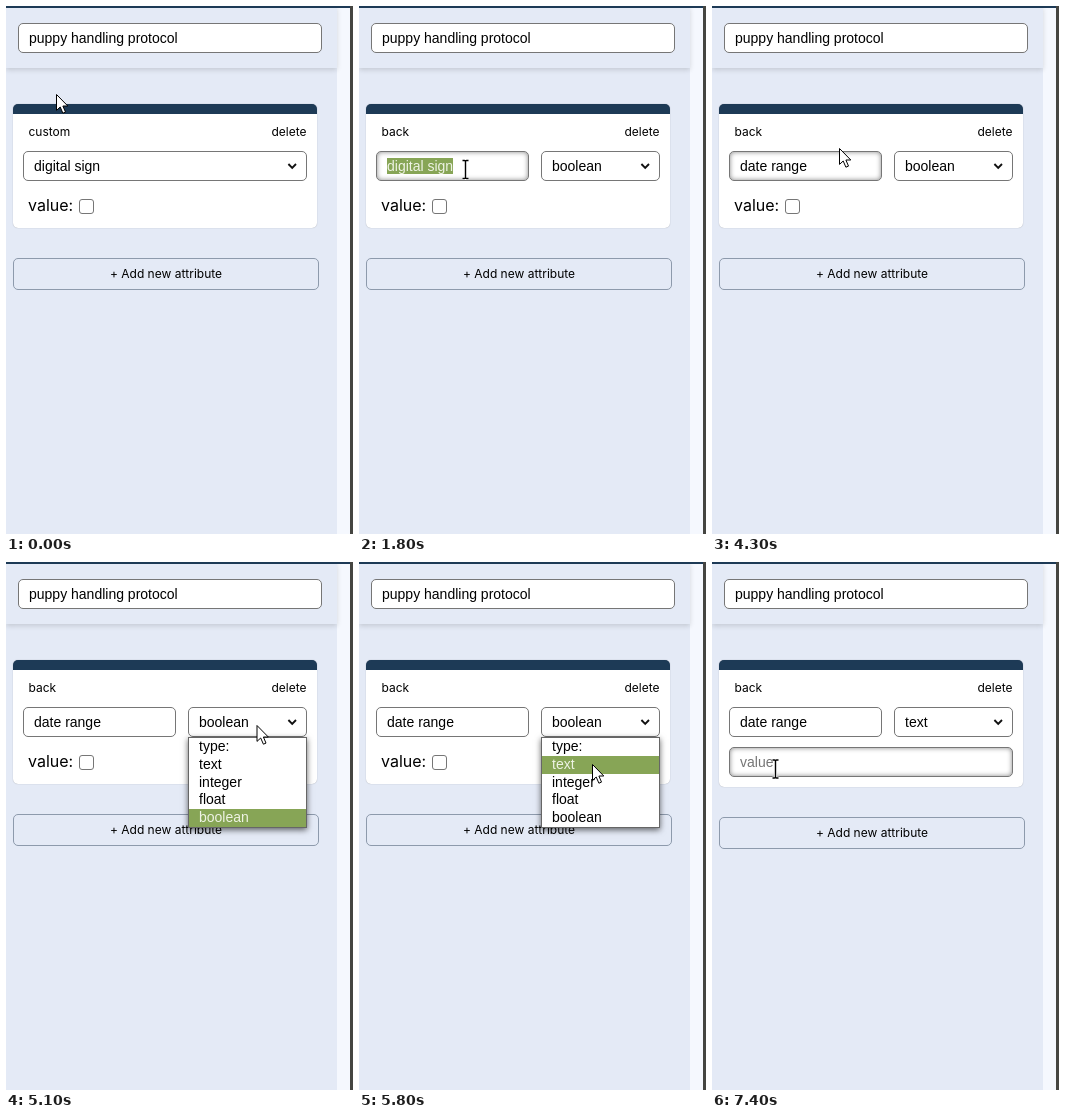
These frames come from a looping animation (347 px wide and 528 px high, 8000 ms). An HTML page:

```html
<!DOCTYPE html>
<html lang="en">
<head>
<meta charset="utf-8">
<title>Attribute editor</title>
<style>
  html, body { margin: 0; width: 100%; height: 100%; overflow: hidden; }
  body { position: relative; background: #e4eaf6; color: #000; font: 14px "Liberation Sans", Arial, sans-serif; }
  div, svg { position: absolute; box-sizing: border-box; white-space: pre; }
  svg { overflow: visible; }
  .field { height: 30px; padding-left: 10px; border: 1px solid #767676; border-radius: 5px; background: #fff; line-height: 28px; }
  .focus { box-shadow: inset 0 0 5px #888; }
  .label { font: 12px/20px Inter, sans-serif; top: 116px; }
  .caret { position: absolute; width: 1px; height: 16px; margin: 6px 0 0 -.5px; background: #000; }
  mark { background: #87a556; color: #eef3e4; }
  #header { width: 331px; height: 62px; background: #e4eaf6; box-shadow: 0 2px 5px rgba(0, 0, 0, .14); }
  #topline { width: 344px; height: 2px; background: #1d3a56; }
  #gutter { left: 331px; width: 16px; height: 100%; background: #f5f8fe; border-right: 3px solid #454541; }
  #name { left: 12px; top: 17px; width: 304px; }
  #card { left: 7px; top: 98px; width: 304px; background: #fff; border-top: 10px solid #1d3a56; border-radius: 5px; box-shadow: 0 0 1px rgba(0, 0, 0, .35); }
  #mode { left: 22.5px; }
  #delete { right: 46.5px; }
  #attr { left: 17px; top: 145px; }
  #type { left: 182px; top: 145px; width: 119px; }
  #value { left: 17px; top: 185px; width: 284px; color: #757575; }
  #check { left: 22px; top: 187px; font: 16px/24px Inter, sans-serif; }
  #check div { left: 51px; top: 6px; width: 15px; height: 15px; border: 1px solid #767676; border-radius: 3px; background: #fff; }
  #add { left: 7px; width: 306px; height: 32px; border: 1px solid #8d9aac; border-radius: 5px; font: 12px/30px Inter, sans-serif; text-align: center; }
  #menu { left: 182px; top: 175px; width: 119px; height: 91px; border: 1px solid #666; background: #fff; box-shadow: 0 2px 6px rgba(0, 0, 0, .6); }
  #menu div { width: 117px; height: 17.8px; padding-left: 10px; line-height: 17px; }
  #menu .on { background: #87a556; color: #eef3e4; }
</style>
</head>
<body>
<div id="gutter"></div>
<div id="header"></div>
<div id="topline"></div>
<div id="name" class="field">puppy handling protocol</div>
<div id="card"></div>
<div id="mode" class="label"></div>
<div id="delete" class="label">delete</div>
<div id="attr" class="field"></div>
<div id="type" class="field"></div>
<svg width="1" height="1"><path d="M282.4 158l3.8 3.8 3.8-3.8" fill="none" stroke="#111" stroke-width="1.9"/></svg>
<div id="check">value:<div></div></div>
<div id="value" class="field"></div>
<div id="add">+ Add new attribute</div>
<div id="menu"></div>
<svg id="pointer" width="1" height="1" fill="#fff" stroke="#000" stroke-linejoin="round">
  <path id="arrow" d="M.5.5V16.4L4.2 13 6.9 19.2 9.5 18.1 6.9 12H11.8Z"/>
  <path id="hand" transform="translate(-5 -1)" d="M4 2C4 .4 6.6.4 6.6 2V6.8C7.5 6 8.9 6.2 9.1 7.3 10 6.7 11.2 7 11.4 8.1 12.5 7.5 13.6 8.3 13.6 9.5V13C13.6 15 12.2 15.6 12.2 17.5H5.2C4.8 15.2 1.6 13 .8 10.6.5 9 2 8.6 3 9.8L4 11Z"/>
  <g id="beam" fill="none">
    <path d="M-3-9H-1Q0-9 0-8V8Q0 9-1 9H-3M3-9H1Q0-9 0-8V8Q0 9 1 9H3" stroke="#fff" stroke-width="3"/>
    <path d="M-3-9H-1Q0-9 0-8V8Q0 9-1 9H-3M3-9H1Q0-9 0-8V8Q0 9 1 9H3" stroke-width="1.4"/>
  </g>
</svg>
<script>
const LOOP = 8000, STEP = 50;
const OPEN_EDIT = 800, FOCUS = 1500, WORD = 1650, ALL = 1800, OPEN_MENU = 5100, PICK = 6000, FOCUS_VALUE = 6800;
const KEYS = [2400, 2500, 2600, 2700, 2850, 3100, 3250, 3450, 3650, 3700];
const OPTIONS = ["type:", "text", "integer", "float", "boolean"];
const ROW = 17.8, MENU_TOP = 176;
const CARET = '<span class="caret"></span>';

// Pointer stops: time, x, y
const PATH = [
  [0, 50, 88], [200, 50, 88], [550, 46, 122],
  [900, 46, 122], [1300, 105.5, 165],
  [1600, 105.5, 165], [1650, 106.5, 163.5],
  [1800, 106.5, 163.5], [1850, 105, 163],
  [1950, 105, 163], [2050, 127, 142],
  [4500, 127, 142], [4750, 320, 190], [4950, 250.5, 163],
  [5200, 250.5, 163], [5500, 247, 214], [5800, 233, 202],
  [5950, 233, 202], [6300, 63.5, 208],
  [6450, 63.5, 208], [6500, 63.5, 207], [LOOP, 63.5, 207]
];

const $ = id => document.getElementById(id);
const show = (id, on) => $(id).style.display = on ? "" : "none";
const within = (x, y, l, t, r, b) => x >= l && x < r && y >= t && y < b;

$("menu").innerHTML = OPTIONS.map((o, i) => `<div style="top:${i * ROW}px">${o}</div>`).join("");

function pointerAt(t) {
  const i = PATH.findIndex(p => p[0] > t);
  const [t0, x0, y0] = PATH[i - 1], [t1, x1, y1] = PATH[i];
  const u = (t - t0) / (t1 - t0), k = u * u * (3 - 2 * u);
  return [x0 + (x1 - x0) * k, y0 + (y1 - y0) * k];
}

function pointerKind(t, x, y) {
  if (within(x, y, 20, 117, 66, 135)) return "hand";
  const overAttr = t >= OPEN_EDIT && within(x, y, 17, 145, 170, 175);
  const overValue = t >= PICK && within(x, y, 17, 185, 301, 215);
  return overAttr || overValue ? "beam" : "arrow";
}

function attrContent(t) {
  if (t >= KEYS[0]) {
    const text = "date range".slice(0, KEYS.filter(k => k <= t).length);
    const caret = t < 4300 || (t >= 4900 && t < OPEN_MENU);
    return text + (caret ? CARET : "");
  }
  if (t >= ALL) return "<mark>digital sign</mark>";
  if (t >= WORD) return "digital <mark>sign</mark>";
  return "digital sign" + (t >= FOCUS ? CARET : "");
}

function render(t) {
  const editing = t >= OPEN_EDIT, picked = t >= PICK;
  const [x, y] = pointerAt(t);

  $("mode").textContent = editing ? "back" : "custom";
  $("attr").style.width = (editing ? 153 : 284) + "px";
  $("attr").innerHTML = attrContent(t);
  $("attr").classList.toggle("focus", t >= FOCUS && t < OPEN_MENU);
  show("type", editing);
  $("type").textContent = picked ? "text" : "boolean";

  show("check", !picked);
  show("value", picked);
  $("value").classList.toggle("focus", t >= FOCUS_VALUE);
  $("value").innerHTML = (t >= FOCUS_VALUE && t < 7400 ? CARET : "") + "value";
  $("card").style.height = (picked ? 127 : 124) + "px";
  $("add").style.top = (picked ? 255 : 252) + "px";

  show("menu", t >= OPEN_MENU && !picked);
  const hover = y < MENU_TOP ? 4 : Math.floor((y - MENU_TOP) / ROW);
  [...$("menu").children].forEach((row, i) => row.classList.toggle("on", i === hover));

  const kind = pointerKind(t, x, y);
  for (const k of ["arrow", "hand", "beam"]) show(k, k === kind);
  $("pointer").style.transform = `translate(${x}px, ${y}px)`;
}

const start = performance.now();
function tick() {
  const t = (performance.now() - start) % LOOP;
  render(Math.floor(t / STEP) * STEP);
  requestAnimationFrame(tick);
}
tick();
</script>
</body>
</html>
```
